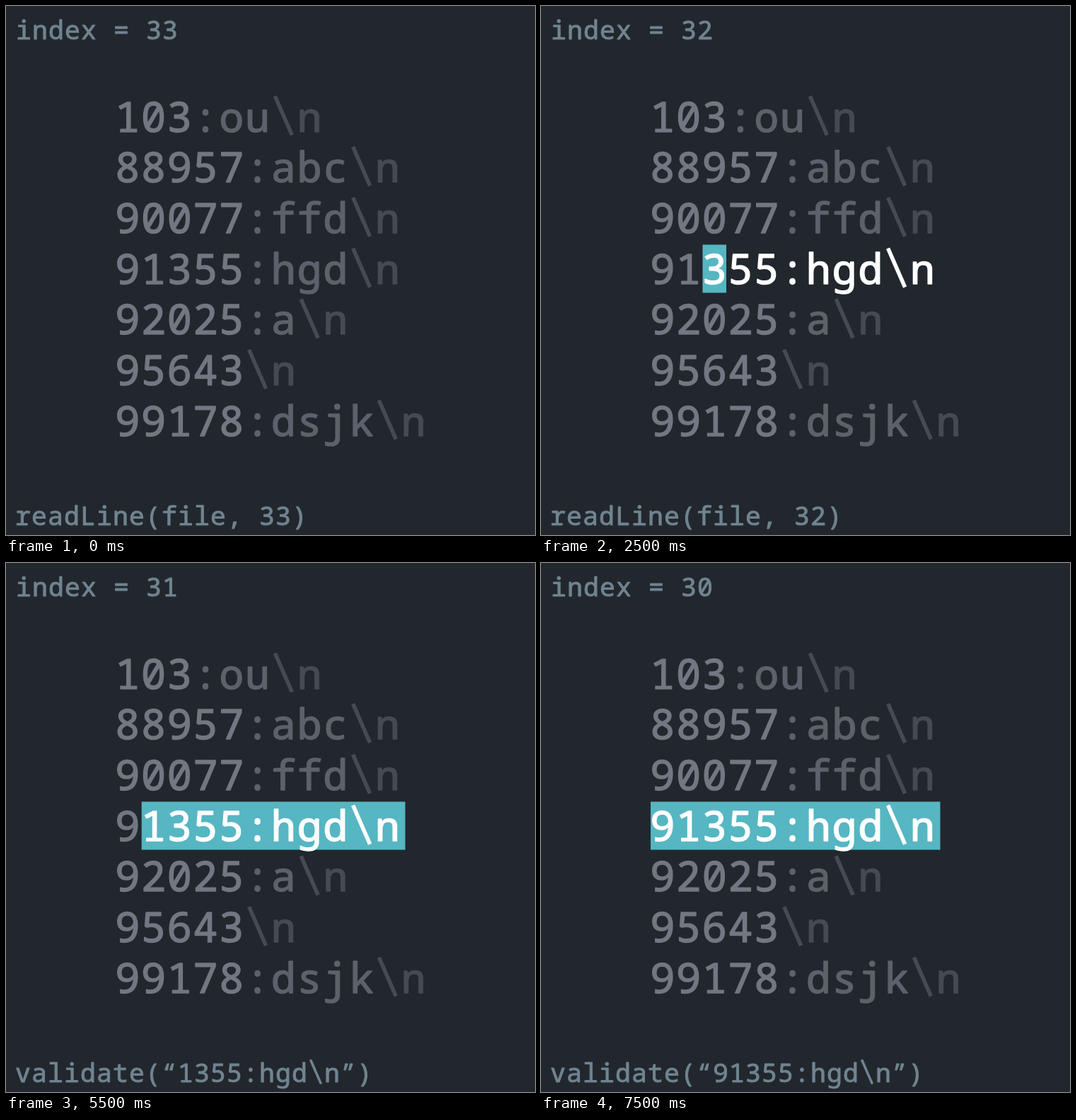
Animation, 748 px wide and 748 px high, one loop 8 s. Source, as an HTML page with a canvas:

```html
<!DOCTYPE html>
<html lang="en">
<head>
<meta charset="utf-8">
<style>
html, body { margin: 0; width: 100%; height: 100%; overflow: hidden; background: #22272e; }
canvas { display: block; width: 748px; height: 748px; }
</style>
</head>
<body>
<canvas id="stage" width="748" height="748"></canvas>
<script>
const ctx = document.getElementById('stage').getContext('2d');
const LOOP = 8000, BEAT = 500;
const FONT = '"Noto Sans Mono", "DejaVu Sans Mono", monospace';
const LEFT = 155, CELL = 36.75, TOP = 177.5, LEADING = 71.7;
const SMALL = 23;
const ACTIVE = 3, RIGHT = 564.5;
const BG = '#22272e', LABEL = '#708490', CYAN = '#56b6c2', RED = '#e06c75';
const KEY = '#737782', VALUE = '#5d616b', BREAK = '#464a53';
const lines = ['103:ou\\n', '88957:abc\\n', '90077:ffd\\n', '91355:hgd\\n',
  '92025:a\\n', '95643\\n', '99178:dsjk\\n'];

function glyph(ch, x, y, cell, color) {
  const u = cell / CELL;
  ctx.fillStyle = ctx.strokeStyle = color;
  if (ch === '\\') {
    // tall slanted bar, reaching above and below the line
    ctx.lineWidth = 5.6 * u;
    ctx.beginPath();
    ctx.moveTo(x - 12 * u, y - 50 * u);
    ctx.lineTo(x + 12 * u, y + 5 * u);
    ctx.stroke();
    return;
  }
  // a thin outline gives the medium weight
  ctx.lineWidth = 1.5 * u;
  ctx.fillText(ch, x, y);
  ctx.strokeText(ch, x, y);
}

function type(text, x, y, cell, colorAt) {
  [...text].forEach((ch, i) => glyph(ch, x + (i + 0.5) * cell, y, cell, colorAt(i)));
}

function shade(line, i) {
  if (i >= line.length - 2) return BREAK;
  const colon = line.indexOf(':');
  return colon >= 0 && i >= colon ? VALUE : KEY;
}

function draw(time) {
  const beat = Math.floor((time % LOOP) / BEAT);
  // the first beat is a pause; each step then has box, range, check, reject
  const step = Math.max(0, Math.floor((beat - 1) / 4));
  const phase = beat === 0 ? -1 : (beat - 1) % 4;
  const index = 33 - step, col = 3 - step;
  const line = lines[ACTIVE];

  ctx.fillStyle = BG;
  ctx.fillRect(0, 0, 748, 748);
  if (phase >= 0) {
    const x = LEFT + col * 36.75;
    ctx.fillStyle = phase === 3 ? RED : CYAN;
    ctx.fillRect(x, 337.5, phase === 0 ? 33.5 : RIGHT - x, 68);
  }

  ctx.textAlign = 'center';
  ctx.lineJoin = 'round';
  ctx.font = '500 58.5px ' + FONT;
  const isLit = i => phase >= 0 && i >= col && (phase > 0 || step > 0 || i === col);
  lines.forEach((text, row) => type(text, LEFT - 1.5, TOP + row * LEADING, CELL,
    i => row === ACTIVE && isLit(i) ? '#ffffff' : shade(text, i)));

  ctx.font = '400 36.5px ' + FONT;
  const call = phase >= 2 ? `validate(“${line.slice(col)}”)` : `readLine(file, ${index})`;
  type(`index = ${index}`, 13.5, 46.5, SMALL, () => LABEL);
  type(call, 12.5, 733.5, SMALL, () => LABEL);
}

function tick() {
  draw(performance.now());
  requestAnimationFrame(tick);
}
tick();
</script>
</body>
</html>
```
